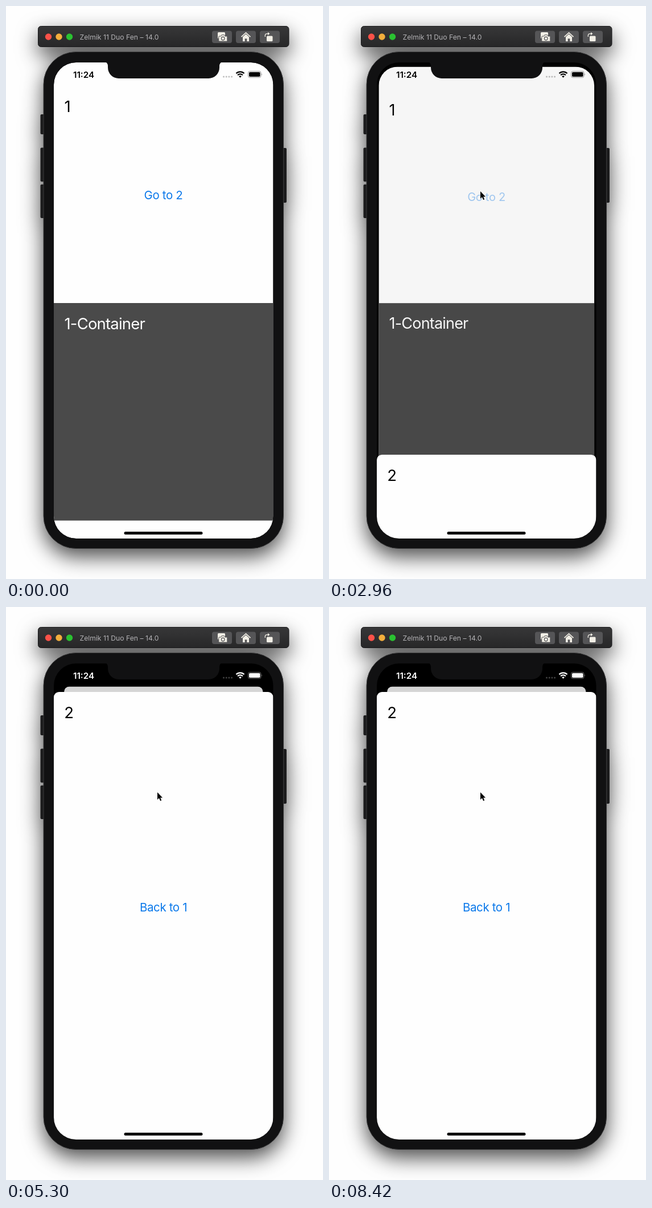
An HTML page for the animation above (8440 ms loop, 557x1005 px).

```html
<!DOCTYPE html>
<html lang="en">
<head>
<meta charset="utf-8">
<title>Sheet presentation</title>
<style>
html, body { margin: 0; width: 100%; height: 100%; overflow: hidden; background: #fefefe; }
svg { display: block; width: 557px; height: 1005px; }
text { font-family: Inter, Roboto, sans-serif; }
.head { font-size: 27.5px; letter-spacing: -.03em; }
.link { font-size: 20.5px; letter-spacing: -.018em; fill: #0a78ea; text-anchor: middle; }
</style>
</head>
<body>
<svg viewBox="0 0 557 1005">
  <defs>
    <filter id="shadow" x="-30%" y="-20%" width="160%" height="140%" color-interpolation-filters="sRGB">
      <feDropShadow dx="0" dy="14" stdDeviation="18" flood-color="#000" flood-opacity=".7"/>
    </filter>
    <linearGradient id="barFill" x2="0" y2="1">
      <stop stop-color="#373738"/><stop offset="1" stop-color="#272728"/>
    </linearGradient>
    <clipPath id="screen"><rect x="84" y="99" width="385.5" height="835" rx="39"/></clipPath>
    <clipPath id="cardClip"><rect id="cardShape" x="84" y="99" width="385.5" height="835"/></clipPath>
  </defs>

  <!-- Device and toolbar bodies -->
  <g filter="url(#shadow)">
    <g fill="#1c1c1d">
      <rect x="60.5" y="190" width="9" height="35" rx="2"/>
      <rect x="60.5" y="248.5" width="9" height="59.5" rx="2"/>
      <rect x="60.5" y="313" width="9" height="59" rx="2"/>
      <rect x="484" y="249" width="9" height="96" rx="2"/>
    </g>
    <rect x="66" y="80.5" width="421.5" height="871" rx="57" fill="#111112" stroke="#3c3c3d"/>
    <rect x="56.5" y="35.5" width="440.5" height="36" rx="5" fill="url(#barFill)" stroke="#18181a"/>
  </g>

  <!-- Toolbar -->
  <circle cx="74.5" cy="54" r="5.7" fill="#fb5148"/>
  <circle cx="93" cy="54" r="5.7" fill="#f3ae3c"/>
  <circle cx="111.5" cy="54" r="5.7" fill="#2ac131"/>
  <text x="129.5" y="58.7" font-size="12.2" fill="#b4b3b6">Zelmik 11 Duo Fen – 14.0</text>
  <g fill="#555557">
    <rect x="362" y="43.5" width="35" height="21.5" rx="4"/>
    <rect x="404" y="43.5" width="35" height="21.5" rx="4"/>
    <rect x="446" y="43.5" width="35" height="21.5" rx="4"/>
  </g>
  <g fill="#f2efe6">
    <rect x="372" y="46" width="13" height="11" rx="1.5"/>
    <path d="M375 53h2.5l1.5-2.3h4.5l1.5 2.3h2.5a1.3 1.3 0 0 1 1.3 1.3v6.4a1.3 1.3 0 0 1-1.3 1.3h-12.500a1.3 1.3 0 0 1-1.3-1.3v-6.4a1.3 1.3 0 0 1 1.3-1.3z" stroke="#555557"/>
    <circle cx="381.2" cy="57" r="2.8" fill="none" stroke="#555557" stroke-width="1.2"/>
    <path d="M413.5 54.2l8-7.4 8 7.4" fill="none" stroke="#f2efe6" stroke-width="1.6"/>
    <path d="M416 54.3l5.5-5 5.5 5v7.7h-3.7v-4.8h-3.6v4.8H416z"/>
    <rect x="458" y="52.5" width="10.5" height="9.5" rx="1.5"/>
    <path d="M455.3 54v-2q0-3.4 3.4-3.4h2" fill="none" stroke="#f2efe6" stroke-width="1.3"/>
    <path d="M460 46l3.5 2.6-3.5 2.6z"/>
  </g>

  <!-- Screen -->
  <g clip-path="url(#screen)">
    <rect x="84" y="99" width="386" height="836"/>
    <g id="card" clip-path="url(#cardClip)">
      <rect x="84" y="99" width="386" height="836" fill="#fefefe"/>
      <rect x="84" y="521" width="386" height="381.5" fill="#4a4a4a"/>
      <text class="head" x="102.5" y="185.5">1</text>
      <text class="head" x="102.5" y="567" fill="#fefefe">1-Container</text>
      <text id="go" class="link" x="276.5" y="338.5">Go to 2</text>
      <rect id="dim" x="84" y="99" width="386" height="836"/>
    </g>
    <g id="sheet">
      <rect x="84" width="385.5" height="830" rx="9" fill="#fefefe"/>
      <text class="head" x="102.2" y="46">2</text>
      <text class="link" x="276.5" y="384.5">Back to 1</text>
    </g>
    <g id="status">
      <text x="118" y="125.5" font-size="15.2" font-weight="600">11:24</text>
      <path d="M382.5 124h15" fill="none" stroke="currentColor" stroke-width="3" stroke-linecap="round" stroke-dasharray="0 4.7" opacity=".25"/>
      <g fill="none" stroke="currentColor" stroke-width="2.3">
        <path d="M404.5 118.3a10 10 0 0 1 14 0"/>
        <path d="M407.1 121.2a6.3 6.3 0 0 1 8.8 0"/>
      </g>
      <path d="M411.5 125.8l-2.3-2.4a3.3 3.3 0 0 1 4.6 0z"/>
      <rect x="425.5" y="114.5" width="22.5" height="11" rx="3" fill="none" stroke="currentColor" opacity=".4"/>
      <rect x="427" y="116" width="19.5" height="8" rx="1.8"/>
      <path d="M449.2 118.2q1.6 1.8 0 3.6z" opacity=".5"/>
    </g>
    <rect x="207.5" y="922" width="138" height="5" rx="2.5"/>
  </g>
  <path d="M172 98q7 0 7 8v2a19 19 0 0 0 19 19h158a19 19 0 0 0 19-19v-2q0-8 7-8z" fill="#111112"/>

  <path id="cursor" d="M0 0v14l3.2-3 2.3 5.4 2.4-1-2.3-5.2h4.3z" stroke="#fff" stroke-width="1.1" stroke-linejoin="round" paint-order="stroke"/>
</svg>
<script>
const LOOP = 8440;
const PRESS = 61, RELEASE = 63.07;
const el = id => document.getElementById(id);
const clamp = x => Math.min(1, Math.max(0, x));
const mix = (a, b, k) => a + (b - a) * k;
const put = (id, name, value) => el(id).setAttribute(name, value);
const ease = x => 1 - (1 - x) ** 3;

// Uneven cadence: three steps every 140 ms, held for 20, 100 and 20 ms
function stepAt(t) {
  const rest = t % 140;
  return 3 * Math.floor(t / 140) + (rest >= 20) + (rest >= 120);
}

function draw(n) {
  // Overdamped spring shared by the sheet and the card behind it
  const p = 1 - Math.exp(-0.223 * Math.max(0, n - RELEASE));
  const scale = mix(1, 0.906, p);
  put('card', 'transform', `translate(276.75 530) scale(${scale}) translate(-276.75 -530)`);
  put('cardShape', 'rx', mix(39, 10, p));
  put('dim', 'opacity', 0.16 * p);
  put('sheet', 'transform', `translate(0 ${mix(934, 149, p)})`);
  put('go', 'opacity', n < PRESS ? 1 : mix(0.3, 1, clamp((n - RELEASE) / 10)));

  const grey = Math.round(255 * clamp((p - 0.2) / 0.8));
  const ink = `rgb(${grey},${grey},${grey})`;
  put('status', 'fill', ink);
  put('status', 'color', ink);

  const y = mix(1010, 325, ease(clamp((n - 6) / 22)));
  put('cursor', 'transform', `translate(266 ${y}) scale(.92)`);
}

const start = performance.now();
function tick() {
  draw(stepAt((performance.now() - start) % LOOP));
  requestAnimationFrame(tick);
}
tick();
</script>
</body>
</html>
```
